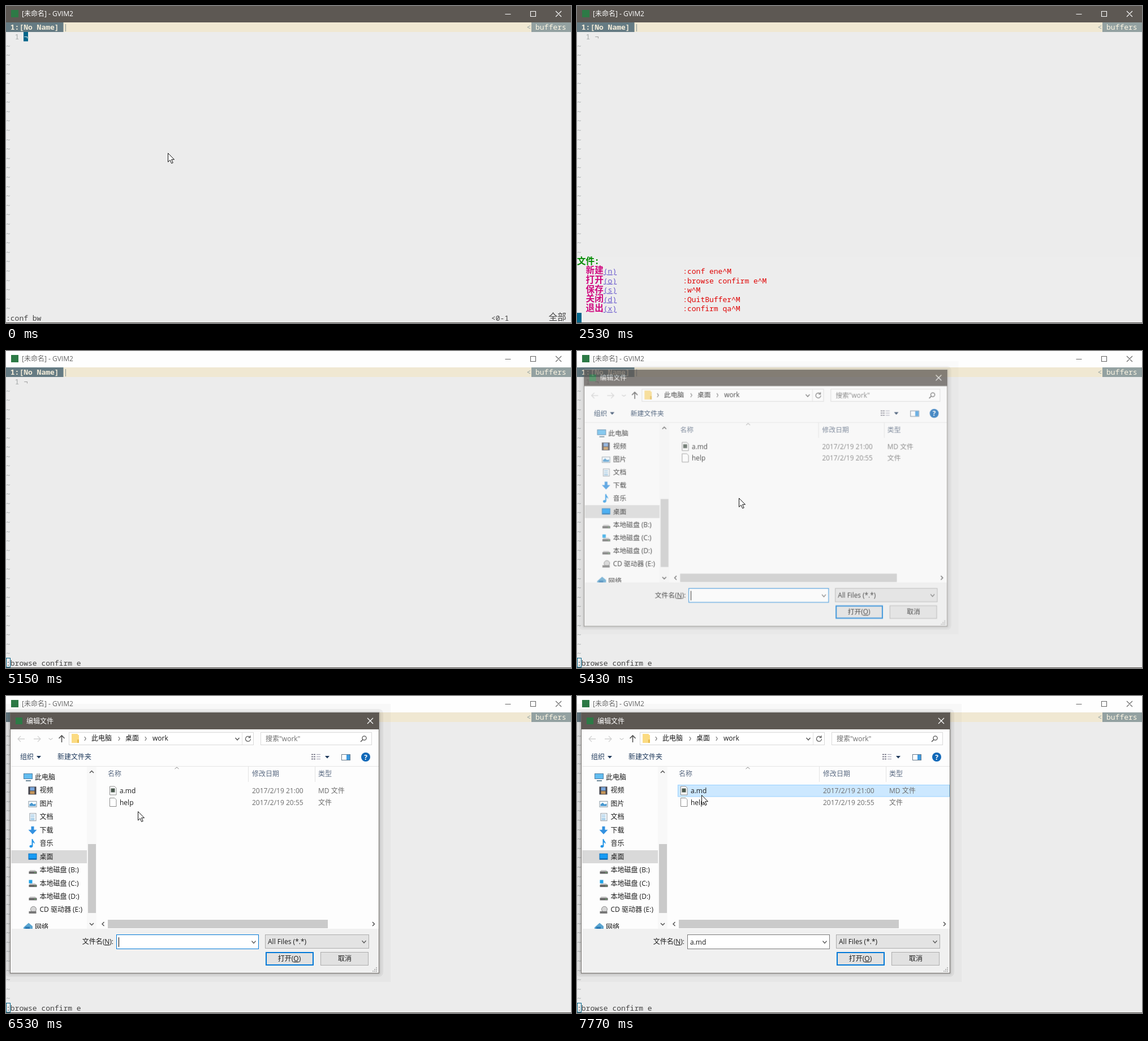
Write an HTML page that moves like this. It is 999 by 561 pixels and loops after 8 s.

```html
<!DOCTYPE html>
<html lang="zh-CN">
<head>
<meta charset="utf-8">
<title>Editor menu</title>
<style>
html, body { margin: 0; width: 100%; height: 100%; overflow: hidden; background: #ececec; }
svg { display: block; width: 999px; height: 561px; }
text { white-space: pre; }
.mono { font: 13px "Noto Sans Mono", "DejaVu Sans Mono", monospace; }
.han { font: 15.6px "Noto Sans Mono CJK SC", "Noto Sans CJK SC", monospace; }
.ui { font: 12px "Open Sans", "Noto Sans CJK SC", sans-serif; }
.b { font-weight: 700; }
.u { text-decoration: underline; }
</style>
</head>
<body>
<svg id="stage" viewBox="0 0 999 561"></svg>
<script>
const LOOP = 8000, COL = 7.8, ROW = 16.6, TOP = 29;
const BLUE = '#0078d7', BLOCK = '#00658a', BAR = '#5d5853', GREY = '#6d6d6d';
const stage = document.getElementById('stage');

function add(parent, tag, attrs = {}) {
  const node = document.createElementNS('http://www.w3.org/2000/svg', tag);
  for (const key in attrs) node.setAttribute(key, attrs[key]);
  return parent.appendChild(node);
}
const group = (parent, attrs) => add(parent, 'g', attrs);
const rect = (p, x, y, width, height, fill, more) =>
  add(p, 'rect', { x, y, width, height, fill, ...more });
const box = (p, x, y, w, h, fill, stroke) =>
  rect(p, x + .5, y + .5, w - 1, h - 1, fill, { stroke });
const line = (p, d, stroke, width = 1) =>
  add(p, 'path', { d, stroke, fill: 'none', 'stroke-width': width });
const shape = (p, d, fill) => add(p, 'path', { d, fill });
function label(p, x, y, str, fill = '#1a1a1a', cls = 'ui', more = {}) {
  const node = add(p, 'text', { x, y, fill, class: cls, ...more });
  node.textContent = str;
  return node;
}
const cell = (p, col, row, str, fill, cls = '') =>
  label(p, col * COL, TOP + row * ROW + 13.4, str, fill, 'mono ' + cls);
const han = (p, col, row, str, fill, cls = '') =>
  label(p, col * COL, TOP + row * ROW + 12.8, str, fill, 'han ' + cls);
function access(p, x, y, before, key, after, anchor = 'start') {
  const node = label(p, x, y, before, '#1a1a1a', 'ui', { 'text-anchor': anchor });
  add(node, 'tspan', { class: 'u' }).textContent = key;
  add(node, 'tspan').textContent = after;
}

// Holds each value until the next listed time.
function hold(node, prop, table) {
  const frames = table.map(([t, v]) => ({ [prop]: v, offset: t / LOOP, easing: 'step-end' }));
  frames.push({ [prop]: table[table.length - 1][1], offset: 1 });
  node.animate(frames, { duration: LOOP, iterations: Infinity });
}
// Shows the node at the first time, then flips it at each further one.
function blink(node, first, ...flips) {
  const table = first ? [[0, 0], [first, 1]] : [[0, 1]];
  flips.forEach((t, i) => table.push([t, i % 2]));
  hold(node, 'opacity', table);
}

function titleBar() {
  const bar = rect(stage, 0, 0, 999, 29.4, BAR);
  const g = group(stage);
  rect(g, 9, 7, 13, 13, '#2d7a46');
  label(g, 28, 18, '[未命名] - GVIM2', 'currentColor');
  line(g, 'M882.5 14.5h10M927.5 9.5h9v9h-9zM972 9l10 10M982 9l-10 10', 'currentColor', 1.1);
  hold(bar, 'fill', [[0, BAR], [5150, '#fefefe']]);
  hold(g, 'color', [[0, '#ffffff'], [5150, '#666666']]);
}

function editor() {
  rect(stage, 0, 29, 999, 17, '#f0e8d2');
  rect(stage, 0, 29, 101.5, 17, '#657b83');
  cell(stage, 1, 0, '1:[No Name]', '#f3ecd9', 'b');
  cell(stage, 13, 0, '|', '#7b8a8c');
  cell(stage, 118, 0, '<', '#93a1a1');
  rect(stage, 929, 29, 70, 17, '#93a1a1');
  cell(stage, 120, 0, 'buffers', '#fdf6e3');
  cell(stage, 2, 1, '1', '#a5a9a9');
  cell(stage, 4, 1, '¬', '#999');
  for (let r = 2; r < 31; r++) cell(stage, 0, r, '~', '#a6abab');

  const cursor = group(stage);
  rect(cursor, 31, 46, 8, 16.5, BLOCK);
  cell(cursor, 4, 1, '¬', '#e8f0f2');
  blink(cursor, 0, 260, 520, 920, 1180, 1590, 1740, 2270);

  const status = group(stage);
  cell(status, 0, 31, ':conf bw', '#444');
  cell(status, 110, 31, '<0-1', '#444');
  han(status, 123, 31, '全部', '#444');
  blink(status, 0, 2270);
}

function menu() {
  const g = group(stage);
  rect(g, 0, 444, 999, 116, '#ededed');
  const list = group(g);
  han(list, 0, 25, '文件:', '#008b00', 'b');
  [['新建', 'n', 'conf ene'], ['打开', 'o', 'browse confirm e'], ['保存', 's', 'w'],
   ['关闭', 'd', 'QuitBuffer'], ['退出', 'x', 'confirm qa']].forEach(([name, key, cmd], i) => {
    han(list, 2, 26 + i, name, '#d0087f', 'b');
    cell(list, 6, 26 + i, `(${key})`, '#6a5acd', 'u');
    cell(list, 24, 26 + i, `:${cmd}^M`, '#e00505');
  });
  const cursor = rect(g, 0, 543, 8, 17, BLOCK);
  blink(g, 2270, 5020);
  blink(list, 2400);
  blink(cursor, 2530, 3060, 3320, 3720, 3980, 4370, 4630);

  const prompt = group(stage);
  cell(prompt, 0, 31, ':browse confirm e', '#444');
  box(prompt, 0, 543, 8, 17, 'none', BLOCK);
  blink(prompt, 5020);
  rect(stage, 0, 560, 999, 1, '#55514d');
}

const chevron = (p, x, y, dx, dy, color = '#555', w = 1.2) =>
  line(p, dx ? `M${x - dx} ${y - 3.5}l${2 * dx} 3.5l${-2 * dx} 3.5`
             : `M${x - 3.5} ${y - dy}l3.5 ${2 * dy}l3.5 ${-2 * dy}`, color, w);

function toolbars(d) {
  line(d, 'M33 76H21m5-5l-5 5l5 5M49 76h12m-5-5l5 5l-5 5', '#d2d2d2', 1.3);
  chevron(d, 79, 76, 0, 1.2, '#ccc');
  line(d, 'M98.500 82V70m-5 5l5-5l5 5', '#555', 1.6);
  box(d, 111, 64, 327, 23, '#fff', '#d9d9d9');
  line(d, 'M417.500 65v21', '#e2e2e2');
  shape(d, 'M116 67h11v2h2v14h-13z', '#fbdb82');
  shape(d, 'M126 77h3v6h-3z', '#e8bc4e');
  [140, 200, 247].forEach(x => chevron(d, x, 75.5, 1.2, 0, '#666', 1.1));
  label(d, 151, 79, '此电脑');
  label(d, 211, 79, '桌面');
  label(d, 259, 79, 'work');
  chevron(d, 409, 76, 0, 2, '#555', 1.4);
  line(d, 'M431 72.500a4.500 4.500 0 1 0 1.500 3.500M432 70v3.500h-3.500', '#666', 1.3);
  box(d, 450, 64, 197, 23, '#fff', '#d9d9d9');
  label(d, 459, 80, '搜索"work"', GREY);
  add(d, 'circle', { cx: 633.5, cy: 74.5, r: 3.6, fill: 'none', stroke: '#555', 'stroke-width': 1.3 });
  line(d, 'M631 77l-4 4', '#555', 1.6);

  label(d, 25, 112, '组织', '#1e395b');
  label(d, 91, 112, '新建文件夹', '#1e395b');
  [54, 564].forEach(x => shape(d, `M${x} 106h8l-4 4.500z`, '#1e395b'));
  for (let i = 0; i < 3; i++) {
    line(d, `M540 ${103.5 + 4 * i}h3m1 0h3`, '#667', 1.5);
    line(d, `M549 ${103.5 + 4 * i}h7`, '#aab', 1.2);
  }
  box(d, 593, 103, 16, 11, '#fff', '#667a8c');
  rect(d, 602, 104, 6, 9, '#3f9be0');
  add(d, 'circle', { cx: 636, cy: 108, r: 8, fill: '#1068b8' });
  label(d, 636, 112.5, '?', '#fff', 'ui b', { 'text-anchor': 'middle' });
  line(d, 'M9 124.500h650', '#e6e6e6');
}

const icons = {
  pc(p) { box(p, 0, -7, 16, 10, '#63bdf0', '#4c7fa6'); rect(p, 4, 5, 9, 2, '#6b8798'); },
  video(p) { rect(p, 0, -7, 14, 14, '#44444c'); rect(p, 3, -6, 8, 6, '#7aa7dd'); rect(p, 3, 1, 8, 5, '#c7975a'); },
  image(p) { box(p, 0, -5, 15, 11, '#f5fbff', '#8a9aa5'); shape(p, 'M2 4V1l4-3 3 3 4-1v4z', '#4797cf'); },
  doc(p) { box(p, 2, -7, 12, 14, '#fff', '#8a98a3'); line(p, 'M4 -3.500h7m-7 3h7m-7 3h7m-7 2h7', '#5da4d6'); },
  down(p) { shape(p, 'M5 -7h5v6h5l-7.500 8l-7.500-8h5z', '#3391e0'); },
  music(p) { shape(p, 'M6 -8h2c0 4 4 4 3 9c-1-3-2-3-3-3v6c0 4-6 4-6 1c0-2 2-3 4-2z', '#2294e6'); },
  desk(p) { box(p, 0, -6, 15, 11, '#169bf5', '#1271b8'); rect(p, 1, 3, 13, 1.5, '#0b5c9e'); },
  disk(p) { shape(p, 'M3 0h9l3 3h-14z', '#c9c9c9'); rect(p, 1, 2.5, 14, 4, '#666'); rect(p, 11, 4, 2, 1, '#6fe36f'); },
  system(p) { icons.disk(p); rect(p, 1, -6, 6, 6, '#20a4e8'); },
  disc(p) { add(p, 'circle', { cx: 9, cy: -1, r: 5, fill: '#d5d5d5', stroke: '#888' }); rect(p, 1, 2.5, 13, 4, '#777'); },
  net(p) { shape(p, 'M0 1l9-8l7 6v10h-16z', '#5ba5d0'); rect(p, 3, 0, 8, 5, '#2a78b3'); }
};

function sidebar(d) {
  rect(d, 143, 125, 17, 287, '#f8f8f8');
  rect(d, 145, 262, 14, 122, '#cacaca');
  line(d, 'M148 136l3.500-3.500l3.500 3.500M148 402l3.500 3.500l3.500-3.500', '#555', 1.5);
  rect(d, 9, 273, 134, 23, '#d9d9d9');
  const clip = add(d, 'clipPath', { id: 'side' });
  rect(clip, 8, 125, 135, 287);
  const list = group(d, { 'clip-path': 'url(#side)' });
  const item = (icon, name, x, y) => {
    icons[icon](group(list, { transform: `translate(${x} ${y})` }));
    label(list, x + 20, y + 4, name);
  };
  item('pc', '此电脑', 31, 144);
  [['video', '视频'], ['image', '图片'], ['doc', '文档'], ['down', '下载'], ['music', '音乐'],
   ['desk', '桌面'], ['disk', '本地磁盘 (B:)'], ['system', '本地磁盘 (C:)'],
   ['disk', '本地磁盘 (D:)'], ['disc', 'CD 驱动器 (E:)']]
    .forEach(([icon, name], i) => item(icon, name, 39.5, 167.4 + 23.45 * i));
  item('net', '网络', 31, 408.5);
}

function fileList(d) {
  line(d, 'M428.500 125v27M546.500 125v27', '#e3e3e3');
  line(d, 'M298.500 129l3.500-3l3.500 3', '#888');
  [[180, '名称'], [435, '修改日期'], [552, '类型']].forEach(([x, s]) => label(d, x, 142, s, '#5a6a82'));

  const first = rect(d, 178.5, 157.5, 480, 20.5, 'transparent', { stroke: 'transparent' });
  const second = rect(d, 178, 178, 481, 20, '#e5f3ff');
  const none = 'rgba(0,0,0,0)', hover = '#e5f3ff';
  hold(first, 'fill', [[0, none], [6120, hover], [6400, none], [6950, hover], [7350, '#cce8ff']]);
  hold(first, 'stroke', [[0, none], [6120, hover], [6400, none], [6950, hover], [7350, '#99d1ff']]);
  blink(second, 6400, 6530);

  [['a.md', '21:00', 'MD 文件'], ['help', '20:55', '文件']].forEach(([name, time, type], i) => {
    const y = 167.5 + 20.5 * i;
    shape(d, `M183.500 ${y - 7.5}h8.500l3 3v12h-11.500z`, '#fff').setAttribute('stroke', '#8c8c8c');
    if (!i) rect(d, 185.5, y - 4, 7, 7, '#4d5a50');
    label(d, 201, y + 4.5, name);
    label(d, 435, y + 4.5, '2017/2/19 ' + time, GREY);
    label(d, 552, y + 4.5, type, GREY);
  });

  rect(d, 180, 396, 389, 15, '#cacaca');
  line(d, 'M173.500 400l-3.500 3.500l3.500 3.500M648 400l3.500 3.500l-3.500 3.500', '#555', 1.5);
}

function footer(d) {
  rect(d, 9, 412, 650, 78, '#f0f0f0');
  access(d, 190, 439, '文件名(', 'N', '):', 'end');
  const field = box(d, 195, 422, 252, 26, '#fff', BLUE);
  hold(field, 'stroke', [[0, BLUE], [7630, '#4a7196'], [7770, '#7a7a7a']]);
  chevron(d, 438, 435.5, 0, 2, '#555', 1.2);
  blink(rect(d, 199, 427, 1, 17, '#000'), 5430, 5990, 6530, 6950);
  blink(label(d, 200, 440, 'a.md'), 7350);

  box(d, 458, 422, 184, 25, '#e3e3e3', '#adadad');
  label(d, 463, 439, 'All Files (*.*)');
  chevron(d, 633, 435, 0, 2, '#555', 1.2);
  rect(d, 460, 454, 83, 22, '#e1e1e1', { stroke: BLUE, 'stroke-width': 2 });
  access(d, 501, 469, '打开(', 'O', ')', 'middle');
  box(d, 556, 453, 85, 24, '#e1e1e1', '#adadad');
  label(d, 599, 469, '取消', '#1a1a1a', 'ui', { 'text-anchor': 'middle' });
  for (let i = 0; i < 3; i++)
    for (let j = 0; j <= i; j++) rect(d, 654 - 3 * j, 480 + 3 * i, 2, 2, '#b8b8b8');
}

function dialog() {
  const d = group(stage, { style: 'transform-origin: 333.5px 259.5px' });
  rect(d, -10, 14, 690, 492, 'rgba(0,0,0,.025)');
  rect(d, -2, 23, 669, 474, 'rgba(0,0,0,.05)', { rx: 8 });
  rect(d, 4, 27, 659, 467, 'rgba(0,0,0,.07)', { rx: 5 });
  rect(d, 8, 29, 652, 462, '#fdfdfd');
  toolbars(d);
  sidebar(d);
  fileList(d);
  footer(d);
  rect(d, 8, 29, 652, 30, BAR);
  rect(d, 17, 38, 12, 12, '#2d7a46');
  label(d, 36, 48.5, '编辑文件', '#fff');
  line(d, 'M639 39l10 10M649 39l-10 10', '#fff', 1.2);
  box(d, 7, 29, 653, 462, 'none', '#6b6763');
  hold(d, 'opacity', [[0, 0], [5430, .74], [5580, 1]]);
  hold(d, 'transform', [[0, 'scale(.985)'], [5580, 'scale(1)']]);
}

function pointer() {
  const p = add(stage, 'path', {
    d: 'M.5 .5v15.500l3.600-3.400l2.600 5.900l2.500-1.100l-2.600-5.700h4.900z',
    fill: '#fff', stroke: '#111', 'stroke-linejoin': 'round'
  });
  const at = [[0, 286, 260], [5990, 214, 188], [6120, 187, 165], [6270, 198, 172], [6400, 219, 188],
    [6530, 233, 204], [6660, 231, 197], [6800, 230, 192], [6950, 220, 175]];
  hold(p, 'transform', at.map(([t, x, y]) => [t, `translate(${x}px, ${y}px)`]));
  blink(p, 0, 2270, 5430);
}

titleBar();
editor();
menu();
dialog();
pointer();
</script>
</body>
</html>
```
